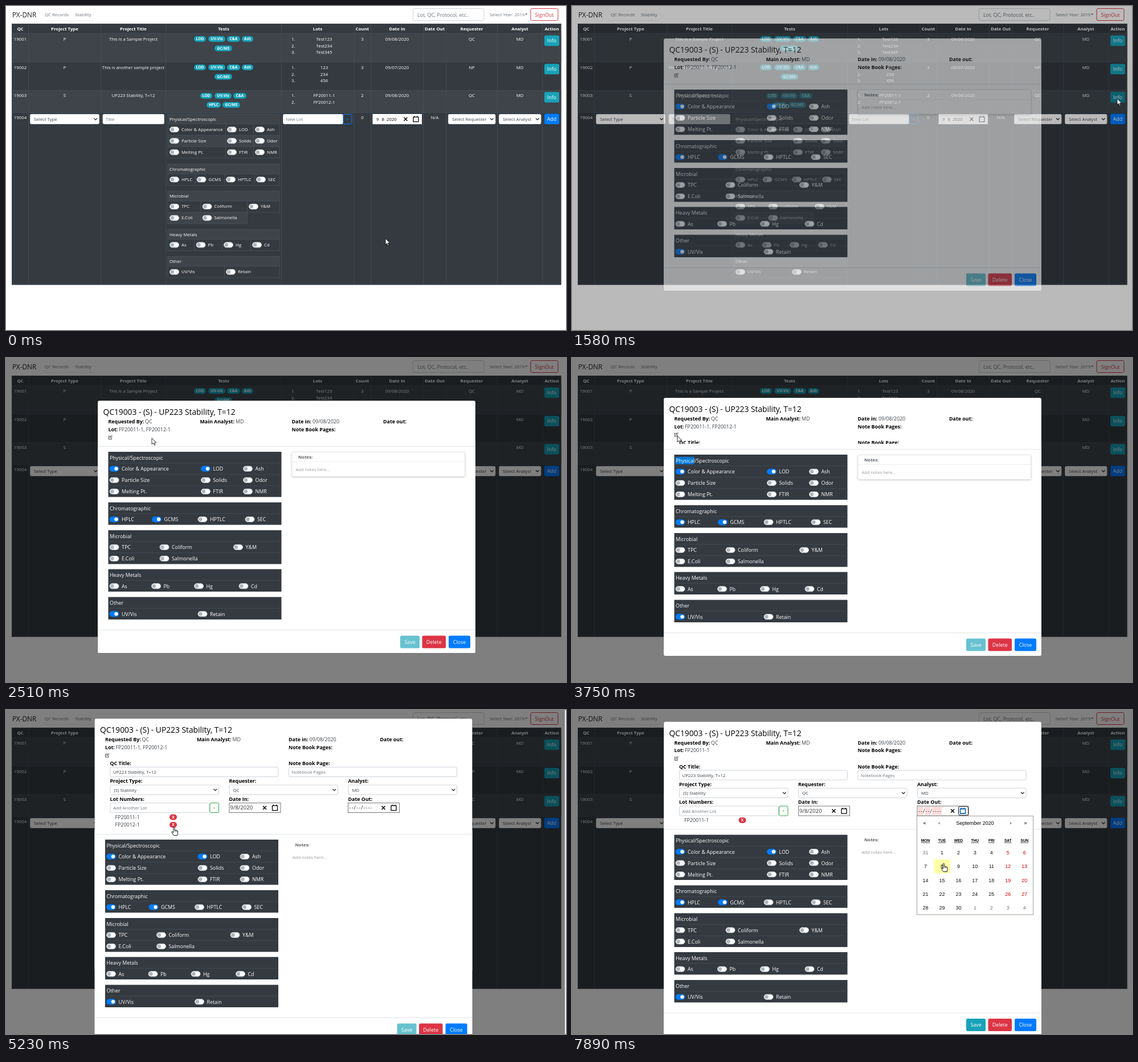
An HTML page for the animation above (8 s loop, 983x570 px).

```html
<!DOCTYPE html>
<html lang="en">
<head>
<meta charset="utf-8">
<title>Lab request tracker</title>
<style>
html, body { margin: 0; width: 100%; height: 100%; overflow: hidden; background: #fff; }
#scene {
  display: block; width: 983px; height: 570px;
  font: 7.8px "Open Sans", "Noto Sans", sans-serif;
  animation: state 8s step-end infinite;
}
text { white-space: pre; }
.c { text-anchor: middle; }
.b { font-weight: 700; }
.w { fill: #fff; }
.g { fill: #6c757d; }
.dk { fill: #3c4248; }
.lg { font-size: 8.9px; }
.pill { font-size: 6.7px; font-weight: 700; fill: #fff; }
.h { font-size: 13.8px; font-weight: 500; }
.date { font-size: 9.5px; fill: #333; }
.blank { letter-spacing: .95px; }
.cal { font: 9px "Liberation Sans", Arial, sans-serif; }
.day { font: 700 6.6px "Liberation Sans", Arial, sans-serif; text-decoration: underline; }

#dim { opacity: var(--dim); }
#modal { opacity: var(--fade); transform: translate(var(--x), var(--y)); }
#body { transform: translateY(var(--h)); }
#press { opacity: var(--press); }
#sel { opacity: var(--sel); }
#card { opacity: var(--card); filter: drop-shadow(0 1px 1.5px #0003); }
.lot2 { fill-opacity: var(--lots); }
#lot2 { opacity: var(--lots); }
#save { opacity: var(--save); }
#hot { opacity: var(--hot); }
.pick { opacity: var(--pick); }
#day1 { opacity: var(--day1); }
#day8 { opacity: var(--day8); }
#bar { opacity: var(--bar); }
#hand { opacity: var(--hand); }
#arrow { opacity: calc(1 - var(--hand)); }
#cursor { animation: move 8s step-end infinite; }

@keyframes state {
  0% { --fade: 0; --dim: 0; --x: 0px; --y: 57px; --h: 0px; --press: 0; --sel: 0; --card: 1;
       --lots: 1; --save: .65; --hot: 0; --pick: 0; --day1: 0; --day8: 0; --bar: 0; --hand: 0; }
  16% { --press: 1; }
  19.75% { --fade: .55; --dim: .27; }
  21.25% { --fade: 1; --dim: .5; --y: 70px; }
  22.9% { --y: 75px; --press: 0; }
  43.5% { --sel: 1; }
  46.875% { --y: 70px; --h: 10px; }
  48.5% { --y: 30px; --h: 90px; --card: 0; }
  50.125% { --x: -5.5px; --y: 15px; --h: 123px; --sel: 0; --bar: 1; }
  60.375% { --hand: 1; }
  66.875% { --x: 0px; --y: 20.5px; --h: 109px; --lots: 0; --save: 1; --bar: 0; --hand: 0; }
  81.5% { --hand: 1; --hot: 1; }
  83.5% { --pick: 1; }
  95.07% { --day1: 1; }
  98.36% { --day1: 0; --day8: 1; }
  100% { --fade: 1; --dim: .5; --x: 0px; --y: 20.5px; --h: 109px; --press: 0; --sel: 0; --card: 0;
         --lots: 0; --save: 1; --hot: 1; --pick: 1; --day1: 0; --day8: 1; --bar: 0; --hand: 1; }
}
@keyframes move {
  0% { transform: translate(666px, 409px); }
  7.375% { transform: translate(666px, 409px); animation-timing-function: steps(6, start); }
  17.725% { transform: translate(957px, 163px); }
  21.25% { transform: translate(957px, 163px); animation-timing-function: steps(7, start); }
  33.06% { transform: translate(256px, 141px); }
  33.25% { transform: translate(256px, 141px); animation-timing-function: steps(3, start); }
  37.75% { transform: translate(188px, 138px); }
  39.75% { transform: translate(185px, 137px); }
  50.125% { transform: translate(185px, 137px); animation-timing-function: steps(4, start); }
  56.6% { transform: translate(254px, 187px); }
  56.625% { transform: translate(254px, 187px); animation-timing-function: steps(3, start); }
  62.25% { transform: translate(295px, 206px); }
  70.375% { transform: translate(295px, 206px); animation-timing-function: steps(8, start); }
  83.23% { transform: translate(685.5px, 182.5px); }
  88.5% { transform: translate(685.5px, 182.5px); animation-timing-function: steps(7, start); }
  100% { transform: translate(652.5px, 270px); }
}
</style>
</head>
<body>
<svg id="scene" viewBox="0 0 983 570"></svg>
<script>
const DARK = '#343a40', LIGHT = '#3e444a', EDGE = '#454d55', BLUE = '#007bff',
      TEAL = '#17a2b8', RED = '#dc3545', RIM = '#ced4da';

// Text is placed by the middle of its capitals.
const text = (x, y, s, cls = '') => `<text x="${x}" y="${y}" dy=".36em" class="${cls}">${s}</text>`;
const box = (x, y, w, h, fill, stroke = 'none', r = 0) =>
  `<rect x="${x}" y="${y}" width="${w}" height="${h}" rx="${r}" fill="${fill}" stroke="${stroke}"/>`;
const path = (d, stroke, width = 1, fill = 'none') =>
  `<path d="${d}" stroke="${stroke}" stroke-width="${width}" fill="${fill}"/>`;
const group = (attrs, ...parts) => `<g ${attrs}>${parts.flat().join('')}</g>`;

const button = (x, y, w, h, fill, label) =>
  box(x, y, w, h, fill, 'none', 2.5) + text(x + w / 2, y + h / 2, label, 'c w lg');
const pill = (x, y, w, label, fill = TEAL) =>
  box(x, y - 5, w, 10, fill, 'none', 5) + text(x + w / 2, y, label, 'c pill');
const field = (x, y, w, label, select, cls = 'g') =>
  box(x + .5, y + .5, w - 1, 17, '#fff', RIM, 2) +
  text(x + (select ? 7 : 5.5), y + 9.3, label, select ? 'dk' : cls) +
  (select ? path(`M${x + w - 9.5} ${y + 7.5}l2.8 2.8 2.8-2.8`, '#333', 1.3) : '');
const calIcon = (x, y, color) =>
  path(`M${x - 4.5} ${y - 3.7}h9v8.4h-9zM${x - 2.5} ${y - 5.5}v2M${x + 2.5} ${y - 5.5}v2`, color, 1.3);
const dateBox = (x, y, w, rim) =>
  box(x + .5, y + .5, w - 1, 17, '#fff', rim) +
  path(`M${x + w - 31.5} ${y + 6}l6 6m0-6l-6 6`, '#000', 1.5) + calIcon(x + w - 10.5, y + 9, '#000');
const toggle = (x, y, on) =>
  box(x, y - 4.5, 16, 9, on ? BLUE : '#fff', on ? BLUE : '#c3c9cf', 4.5) +
  `<circle cx="${x + (on ? 11.5 : 4.5)}" cy="${y}" r="3.2" fill="${on ? '#fff' : '#adb5bd'}"/>`;

const tests = [
  ['Physical/Spectroscopic', ['Color & Appearance', 'LOD', 'Ash'],
    ['Particle Size', 'Solids', 'Odor'], ['Melting Pt.', 'FTIR', 'NMR']],
  ['Chromatographic', ['HPLC', 'GCMS', 'HPTLC', 'SEC']],
  ['Microbial', ['TPC', 'Coliform', 'Y&M'], ['E.Coli', 'Salmonella']],
  ['Heavy Metals', ['As', 'Pb', 'Hg', 'Cd']],
  ['Other', ['UV/Vis', 'Retain']]
];
const chosen = ['Color & Appearance', 'LOD', 'HPLC', 'GCMS', 'UV/Vis'];

function pageTests() {
  const tops = [190, 278, 325.5, 393, 440.5];
  const cols = [[288, 389, 438], [288, 335.5, 387, 440], [288, 345.5, 427], [288, 334.5, 383, 433], [288, 387]];
  return tests.map(([name, ...rows], g) => {
    const top = tops[g];
    return box(284, top, 196, 17.5, LIGHT, EDGE) + text(287, top + 9, name, 'w') +
      rows.map((row, k) => {
        const y = top + 17.5 + 20 * k, w = g === 2 && k ? 139.5 : 196;
        return box(284, y, w, 20, k % 2 ? LIGHT : DARK, EDGE) +
          row.map((label, i) => {
            const x = cols[g][i];
            return (i ? path(`M${x - 3.5} ${y}v20`, EDGE) : '') +
              toggle(x - .5, y + 9.8) + text(x + 20, y + 9.3, label, 'w');
          }).join('');
      }).join('');
  });
}

function modalTests() {
  const tops = [90, 179, 228, 296.5, 345.5];
  const cols = [[182, 342.5, 416.5], [182, 256.5, 337, 420], [182, 270, 399.5], [182, 255.5, 330.5, 409], [182, 337]];
  return tests.map(([name, ...rows], g) => {
    const top = tops[g];
    return box(179.5, top, 304, 19.5 + 20 * rows.length, DARK) +
      (g ? '' : `<rect id="sel" x="181.5" y="${top + 4}" width="33" height="13" fill="#0078d7"/>`) +
      text(182, top + 10.3, name, 'w lg') +
      rows.map((row, k) => {
        const y = top + 29.8 + 20 * k;
        return path(`M179.5 ${y - 10}h304`, EDGE, .8) + row.map((label, i) =>
          toggle(cols[g][i], y, chosen.includes(label)) + text(cols[g][i] + 21, y, label, 'w lg')).join('');
      }).join('');
  });
}

function page() {
  const edges = [10.5, 39.5, 166.5, 281, 483.5, 611, 640.5, 732.5, 773, 862.5, 942, 974];
  const mids = [25, 103, 223.5, 382, 547, 625.5, 686.5, 752.5, 817.5, 902, 958];
  const heads = ['QC', 'Project Type', 'Project Title', 'Tests', 'Lots', 'Count',
    'Date In', 'Date Out', 'Requester', 'Analyst', 'Action'];
  const rows = [
    [58, '19001', 'P', 'This is a Sample Project', ['Test123', 'Test234', 'Test345'], '09/08/2020', 'QC'],
    [108, '19002', 'P', 'This is another sample project', ['123', '234', '456'], '09/07/2020', 'NP'],
    [157.5, '19003', 'S', 'UP223 Stability, T=12', ['FP20011-1', 'FP20012-1'], '09/08/2020', 'QC']
  ];
  const mainPills = (x, y) =>
    pill(x, y, 21, 'LOD') + pill(x + 25, y, 30, 'UV-Vis') + pill(x + 58, y, 23, 'C&A');
  return [
    `<text x="11" y="15.5" dy=".36em" font-size="11.8" fill="#222">PX-DNR</text>`,
    text(68, 15.5, 'QC Records', 'g'), text(121, 15.5, 'Stability', 'g'),
    path('M64 25.5h90', '#eee'),
    box(714.5, 4.5, 124.5, 21, '#fff', RIM, 2.5), text(722, 15.5, 'Lot, QC, Protocol, etc..', 'g lg'),
    text(849, 14.8, 'Select Year: 2019', 'g'), path('M911 13.5h4.6l-2.3 2.6z', 'none', 0, '#6c757d'),
    box(921, 4.5, 48, 21, '#fff', RED, 2.5),
    `<text x="945" y="15.5" dy=".36em" class="c lg" fill="${RED}">SignOut</text>`,
    box(10, 31, 964.5, 459.5, DARK), box(10, 48, 964.5, 50, LIGHT), box(10, 148, 964.5, 39.5, LIGHT),
    path(edges.map(x => `M${x} 31v459`).join('') + [31.5, 48, 98.5, 148.5, 187.5, 490].map(y => `M10 ${y}h964.5`).join(''), EDGE, .9),
    heads.map((s, i) => text(mids[i], 40.5, s, 'c b w')),
    rows.map(([y, id, type, title, lots, date, who]) => [
      text(25, y, id, 'c w'), text(mids[1], y, type, 'c w'), text(mids[2], y, title, 'c w'),
      lots.map((s, i) => text(501, y + 11.7 * i, `${i + 1}.`, 'w') + text(558.5, y + 11.7 * i, s, 'c w')),
      text(mids[5], y, lots.length, 'c w'), text(mids[6], y, date, 'c w'),
      text(mids[8], y, who, 'c w'), text(mids[9], y, 'MD', 'c w'),
      button(945, y - 6.3, 26, 18.5, TEAL, 'Info')
    ].flat().join('')),
    group('id="press"', button(945, 151.2, 26, 18.5, '#138496', 'Info')),
    [58, 108].map(y => mainPills(330, y) + pill(414, y, 20, 'Ash') + pill(366, y + 16.5, 31, 'GC/MS')),
    mainPills(341, 158), pill(352, 174, 25, 'HPLC'), pill(380, 174, 31, 'GC/MS'),
    text(25, 196, '19004', 'c w'),
    field(42, 190, 122, 'Select Type', true), field(169.5, 190, 108.5, 'Title'),
    pageTests(),
    field(486, 190, 106, 'New Lot'), box(592, 190.5, 15, 17, DARK, BLUE, 2),
    `<text x="599.5" y="199" dy=".36em" class="c" fill="${BLUE}">+</text>`,
    text(mids[5], 196, '0', 'c w'),
    dateBox(643.5, 190, 86.5, '#fff'),
    text(650, 199, '9'), text(659.5, 199, '8'), text(668, 199, '2020'),
    text(mids[7], 196, 'N/A', 'c w'),
    field(776, 190, 83.5, 'Select Requester', true), field(865, 190, 74.5, 'Select Analyst', true),
    button(945, 189.5, 26, 18.5, BLUE, 'Add')
  ].flat().join('');
}

function form() {
  const label = (x, y, s) => text(x, y, s, 'b lg');
  const lot = (y, s) => text(197, y, s, 'dk lg') + pill(292.5, y, 13, 'X', RED);
  return [
    label(188, 79, 'QC Title:'), label(501.5, 79, 'Note Book Page:'),
    field(188, 85, 296, 'UP223 Stability, T=12', false, 'dk'), field(501.5, 85, 296, 'Notebook Pages'),
    [[188, 'Project Type:', '(S) Stability'], [397, 'Requester:', 'QC'], [606, 'Analyst:', 'MD']]
      .map(([x, s, v]) => label(x, 110, s) + field(x, 116.5, 191.5, v, true)),
    label(188, 141.5, 'Lot Numbers:'), label(397, 141.5, 'Date In:'), label(606, 141.5, 'Date Out:'),
    field(188, 148, 175, 'Add Another Lot'), box(363.5, 148.5, 15.5, 17, '#fff', '#28a745', 2),
    '<text x="371" y="157" dy=".36em" class="c" fill="#28a745">+</text>',
    dateBox(397, 148, 91, '#777'), text(399, 157, '9/8/2020', 'date'),
    dateBox(605.5, 148, 91, '#777'),
    group('class="pick" fill="#ffdcdc"', [[607.5, 9], [620, 9], [632.5, 16.5]]
      .map(([x, w]) => `<rect x="${x}" y="149.5" width="${w}" height="14.5"/>`)),
    text(608, 157, '--/--/----', 'date blank'),
    group('id="hot"', calIcon(686, 157, '#0078d7')),
    group('class="pick"', box(678.5, 149.3, 17, 15.4, 'none', '#111', 2.5)),
    lot(173.5, 'FP20011-1'), group('id="lot2"', lot(187, 'FP20012-1'))
  ].flat().join('');
}

function modal() {
  const facts = [[179.5, 37, 'Requested By:', 244, 'QC'], [340.5, 37, 'Main Analyst:', 403, 'MD'],
    [501.5, 37, 'Date in:', 538, '09/08/2020'], [662, 37, 'Date out:', 702, ''],
    [179.5, 50.7, 'Lot:', 198, 'FP20011-1<tspan class="lot2">, FP20012-1</tspan>'],
    [501.5, 50.7, 'Note Book Pages:', 580, '']];
  return group('id="modal"',
    box(161, 0, 663, 444, '#fff', '#0003', 3),
    text(170.5, 20.5, 'QC19003 - (S) - UP223 Stability, T=12', 'h'),
    facts.map(([x, y, s, vx, v]) => text(x, y, s, 'b lg') + text(vx, y, v, 'dk lg')),
    path('M184 62.5h-4v5.5h5.5v-3M182 66l.4-1.6 3.2-3 1 1-3.2 3z', '#333', .8),
    form(),
    group('id="body"',
      box(161, 71, 663, 373, '#fff', 'none', 3),
      path('M161 80.5h663M161 403.5h663', '#dee2e6', .9),
      modalTests(),
      group('id="card"', box(502, 90.5, 303.5, 43, '#fff', '#e6e6e6', 2), path('M502 107.5h303', '#eee')),
      '<text x="513" y="99" dy=".36em" class="b" fill="#5c6268">Notes:</text>',
      '<text x="508.5" y="121" dy=".36em" font-size="7.6" fill="#999">Add notes here...</text>',
      group('id="save"', button(692, 413.5, 34, 22, TEAL, 'Save')),
      button(730.5, 413.5, 41.5, 22, RED, 'Delete'), button(777, 413.5, 38, 22, BLUE, 'Close')));
}

function picker() {
  const colX = i => 620.5 + 28.95 * i, rowY = r => 250.7 + 24.35 * r;
  const tile = (id, c, r, fill) =>
    `<rect id="${id}" x="${colX(c) - 14.4}" y="${rowY(r) - 12.2}" width="28.9" height="24.3" fill="${fill}"/>`;
  const days = Array.from({ length: 35 }, (_, i) => {
    const near = i === 0 || i > 30, c = i % 7;
    const n = i === 0 ? 31 : i > 30 ? i - 30 : i;
    const fill = near ? '#757575' : c > 4 ? '#d10000' : '#111';
    return `<text x="${colX(c)}" y="${rowY(Math.floor(i / 7))}" dy=".36em" class="c cal" fill="${fill}">${n}</text>`;
  });
  return group('class="pick"',
    box(605.5, 186.5, 204, 173.5, '#fff', '#a0a096'),
    [[619, '«'], [644.5, '‹'], [707.5, 'September 2020'], [770, '›'], [796, '»']]
      .map(([x, s]) => text(x, 198.7, s, 'c cal')),
    ['MON', 'TUE', 'WED', 'THU', 'FRI', 'SAT', 'SUN'].map((s, i) => text(colX(i), 230, s, 'c day')),
    tile('today', 1, 1, '#ffff76'), tile('day1', 1, 0, '#e6e6e6'), tile('day8', 1, 1, '#ffffa9'),
    days);
}

const cursor = group('id="cursor"',
  group('id="arrow"', path('M0 0V11L2.6 8.6 4.4 12.4 6 11.7 4.3 8H7.8Z', '#000', .8, '#fff')),
  group('id="hand"', path('M-1.2 1.2a1.2 1.2 0 0 1 2.4 0V5.2l3.8.8q1.9.6 1.7 2.5L5.8 14.5H-.6L-4 9.6q-.4-1.7 1.1-1.4L-1.2 9.6Z', '#000', .9, '#fff'),
    path('M1.2 5.2v3M3.2 5.8v2.6M5 6.3v2.2', '#000', .6)));

document.getElementById('scene').innerHTML =
  page() + '<rect id="dim" width="983" height="570"/>' + modal() + picker() +
  '<rect id="bar" x="981" width="2" height="570" fill="#f0f0f0"/>' + cursor;
</script>
</body>
</html>
```
